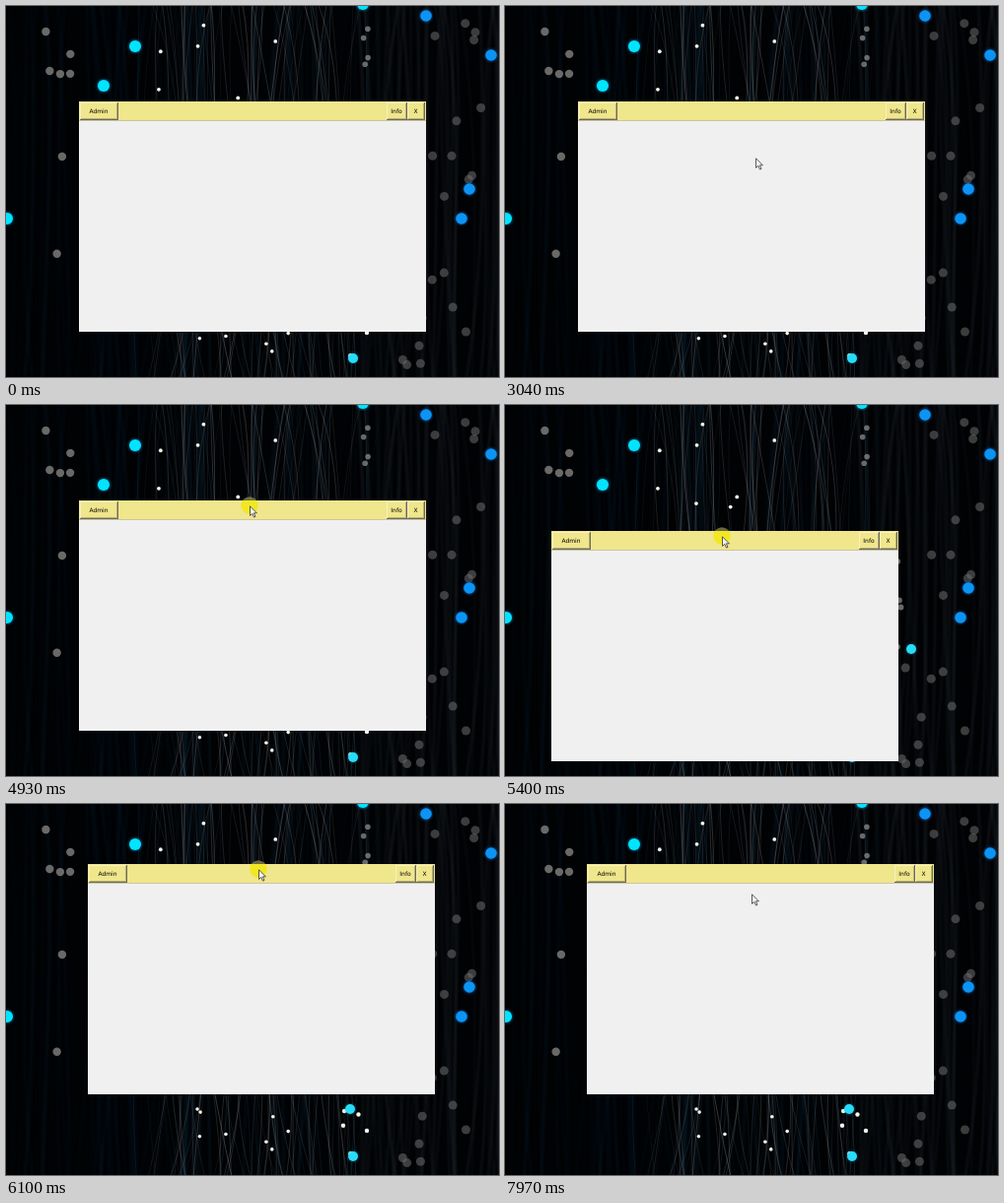
These frames come from a looping animation (500 px wide and 377 px high, 8000 ms). An HTML page with a canvas:

```html
<!DOCTYPE html>
<html lang="en">
<head>
<meta charset="utf-8">
<title>Draggable window</title>
<style>
html, body { margin: 0; width: 100%; height: 100%; overflow: hidden; background: #010204; }
canvas { display: block; }
</style>
</head>
<body>
<canvas id="stage" width="500" height="377"></canvas>
<script>
const W = 500, H = 377, LOOP = 8000;
const WIN_W = 352, WIN_H = 234, BAR_H = 20;
const GRIP = [173, 5];
const KHAKI = '#f0e68c';
const ctx = document.getElementById('stage').getContext('2d');

// The pointer moves in discrete steps along curves; each starts where the last ended.
const moves = [];
function move(start, end, steps, ...path) {
  const last = moves[moves.length - 1];
  const from = last ? last.path[last.path.length - 1] : [440, 316];
  moves.push({ start, end, steps, path: [from, ...path] });
}
move(610, 760, 3, [389, 229]);
move(1060, 1610, 8, [375, 155], [396, 104]);
move(2100, 2560, 7, [280, 113]);
move(2800, 3040, 4, [254, 154]);
move(3440, 3900, 7, [260, 182], [224, 228], [208, 215], [233, 212]);
move(4290, 4540, 4, [247, 102]);
move(5070, 5310, 4, [226, 142]);
move(5390, 5630, 4, [220, 133], [206, 90], [197, 57], [196, 53]);
move(5860, 6170, 5, [222, 58], [252, 65], [256, 66]);
move(6490, 6650, 3, [229, 108]);
move(7030, 7350, 5, [279, 130], [218, 152]);
move(7730, 7970, 4, [250, 91]);

const PRESSES = [[3290, 4070], [4930, 6170], [6810, 7500]];
const [, DRAG] = PRESSES;

function spline(pts, u) {
  const last = pts.length - 1;
  const i = Math.min(last - 1, Math.floor(u * last));
  const f = u * last - i;
  const at = k => pts[Math.max(0, Math.min(last, k))];
  return [0, 1].map(d => {
    const a = at(i - 1)[d], b = at(i)[d], c = at(i + 1)[d], e = at(i + 2)[d];
    return Math.round(b + f * (c - a + f * (2 * a - 5 * b + 4 * c - e + f * (3 * (b - c) + e - a))) / 2);
  });
}

function pointerAt(t) {
  const m = moves.filter(m => m.start <= t).pop();
  if (!m) return null;
  const done = Math.floor((t - m.start) / (m.end - m.start) * (m.steps - 1) + 1e-6);
  return spline(m.path, Math.min(m.steps, done + 1) / m.steps);
}

// The window hangs on the pointer during the drag and rests otherwise.
function windowAt(t) {
  const [x, y] = pointerAt(Math.max(DRAG[0], Math.min(t, DRAG[1])));
  return [x - GRIP[0], y - GRIP[1]];
}

function seeded(seed) {
  return () => {
    seed = (seed * 1664525 + 1013904223) >>> 0;
    return seed / 4294967296;
  };
}

function drawBackdrop() {
  const cv = document.createElement('canvas');
  cv.width = W;
  cv.height = H;
  const g = cv.getContext('2d');
  const rnd = seeded(77);
  const span = (a, b) => a + (b - a) * rnd();

  function strands(n, x0, x1, sway, rgb, alpha, width, blur) {
    g.filter = `blur(${blur}px)`;
    for (let i = 0; i < n; i++) {
      const x = span(x0, x1);
      const s = () => x + span(-sway, sway);
      g.strokeStyle = `rgba(${rgb},${span(alpha * 0.25, alpha)})`;
      g.lineWidth = span(width * 0.5, width);
      g.beginPath();
      g.moveTo(s(), -5);
      g.bezierCurveTo(s(), 110, s(), 250, s(), H + 5);
      g.stroke();
    }
    g.filter = 'none';
  }

  function dot(x, y, r, color, blur) {
    g.filter = `blur(${blur}px)`;
    g.fillStyle = color;
    g.beginPath();
    g.arc(x, y, r, 0, 7);
    g.fill();
    g.filter = 'none';
  }

  function scatter(n, x0, x1, y0, y1, r, color) {
    for (let i = 0; i < n; i++) dot(span(x0, x1), span(y0, y1), r, color, 0.6);
  }

  function lights(color, halo, r, ...spots) {
    for (const [x, y] of spots) {
      dot(x, y, r + 1, halo, 1.2);
      dot(x, y, r, color, 0.7);
    }
  }

  g.fillStyle = '#010204';
  g.fillRect(0, 0, W, H);
  strands(26, 0, 140, 10, '14,40,56', 0.32, 3, 1.4);
  strands(34, 120, 370, 18, '20,55,74', 0.32, 2.5, 1);
  strands(40, 355, 500, 12, '38,44,50', 0.42, 3, 1.2);
  strands(56, 150, 345, 30, '170,178,184', 0.36, 0.9, 0.2);
  strands(14, 130, 380, 26, '50,120,150', 0.32, 0.9, 0.2);

  const grey = 'rgba(150,148,145,.7)', dim = 'rgba(110,110,110,.55)', white = '#f8f5ea';
  scatter(5, 37, 71, 15, 77, 4.2, grey);
  scatter(2, 50, 59, 152, 278, 4.2, grey);
  scatter(11, 428, 486, 0, 206, 4.5, dim);
  scatter(10, 400, 484, 250, 370, 4.5, dim);
  scatter(4, 362, 373, 17, 87, 2.8, grey);
  scatter(7, 384, 410, 150, 260, 3, grey);
  scatter(8, 154, 290, 15, 112, 1.9, white);
  scatter(8, 174, 300, 290, 374, 1.8, white);
  scatter(6, 341, 367, 308, 357, 2.2, white);

  lights('#0c94f4', 'rgba(0,100,200,.5)', 5.8, [426, 10], [492, 50], [470, 186], [462, 216]);
  lights('#00e4ff', 'rgba(0,150,210,.5)', 6, [131, 41], [99, 81], [1, 216], [362, -2]);
  lights('#28dcf8', 'rgba(0,140,190,.3)', 5, [351, 289], [349, 310], [352, 358], [412, 248]);
  return cv;
}

function button(x, y, w, label) {
  const h = 18;
  const layer = (color, left, right) => {
    ctx.fillStyle = color;
    ctx.fillRect(x + left, y + left, w - left - right, h - left - right);
  };
  layer('#6c6a58', 0, 0);
  layer('#f7f1c0', 0, 1);
  layer('#b4ad78', 1, 1);
  layer(KHAKI, 1, 2);
  ctx.fillStyle = '#000';
  ctx.fillText(label, x + w / 2 - 0.5, y + 9.5);
}

function drawWindow(x, y) {
  ctx.fillStyle = '#f0f0f0';
  ctx.fillRect(x, y, WIN_W, WIN_H);
  ctx.fillStyle = KHAKI;
  ctx.fillRect(x, y, WIN_W, BAR_H);
  ctx.fillStyle = '#cbc5a0';
  ctx.fillRect(x, y + BAR_H - 1, WIN_W, 1);
  ctx.font = '6px "DejaVu Sans", sans-serif';
  ctx.textAlign = 'center';
  ctx.textBaseline = 'middle';
  button(x + 1, y + 1, 39, 'Admin');
  button(x + 312, y + 1, 21, 'Info');
  button(x + 333, y + 1, 18, 'X');
}

function disc([x, y], color) {
  ctx.fillStyle = color;
  ctx.beginPath();
  ctx.arc(x, y, 8.7, 0, 7);
  ctx.fill();
}

function drawPointer([x, y]) {
  ctx.save();
  ctx.translate(x + 0.5, y + 0.8);
  ctx.fillStyle = '#f4f4f4';
  ctx.strokeStyle = '#333';
  ctx.lineWidth = 0.8;
  const arrow = new Path2D('M0 0V9.6L2.3 7.6 4 11.3 5.5 10.6 3.9 7H6.9Z');
  ctx.fill(arrow);
  ctx.stroke(arrow);
  ctx.restore();
}

const backdrop = drawBackdrop();

function render(t) {
  const tip = pointerAt(t);
  const [wx, wy] = windowAt(t);
  const pressed = PRESSES.some(([a, b]) => t >= a && t < b);

  ctx.drawImage(backdrop, 0, 0);
  if (pressed) disc(tip, 'rgba(150,145,90,.7)');
  drawWindow(wx, wy);
  if (pressed) {
    ctx.save();
    ctx.beginPath();
    ctx.rect(wx, wy, WIN_W, WIN_H);
    ctx.clip();
    disc(tip, 'rgba(240,232,12,.82)');
    ctx.restore();
  }
  if (tip) drawPointer(tip);
}

const began = performance.now();
function tick() {
  render((performance.now() - began) % LOOP);
  requestAnimationFrame(tick);
}
tick();
</script>
</body>
</html>
```
